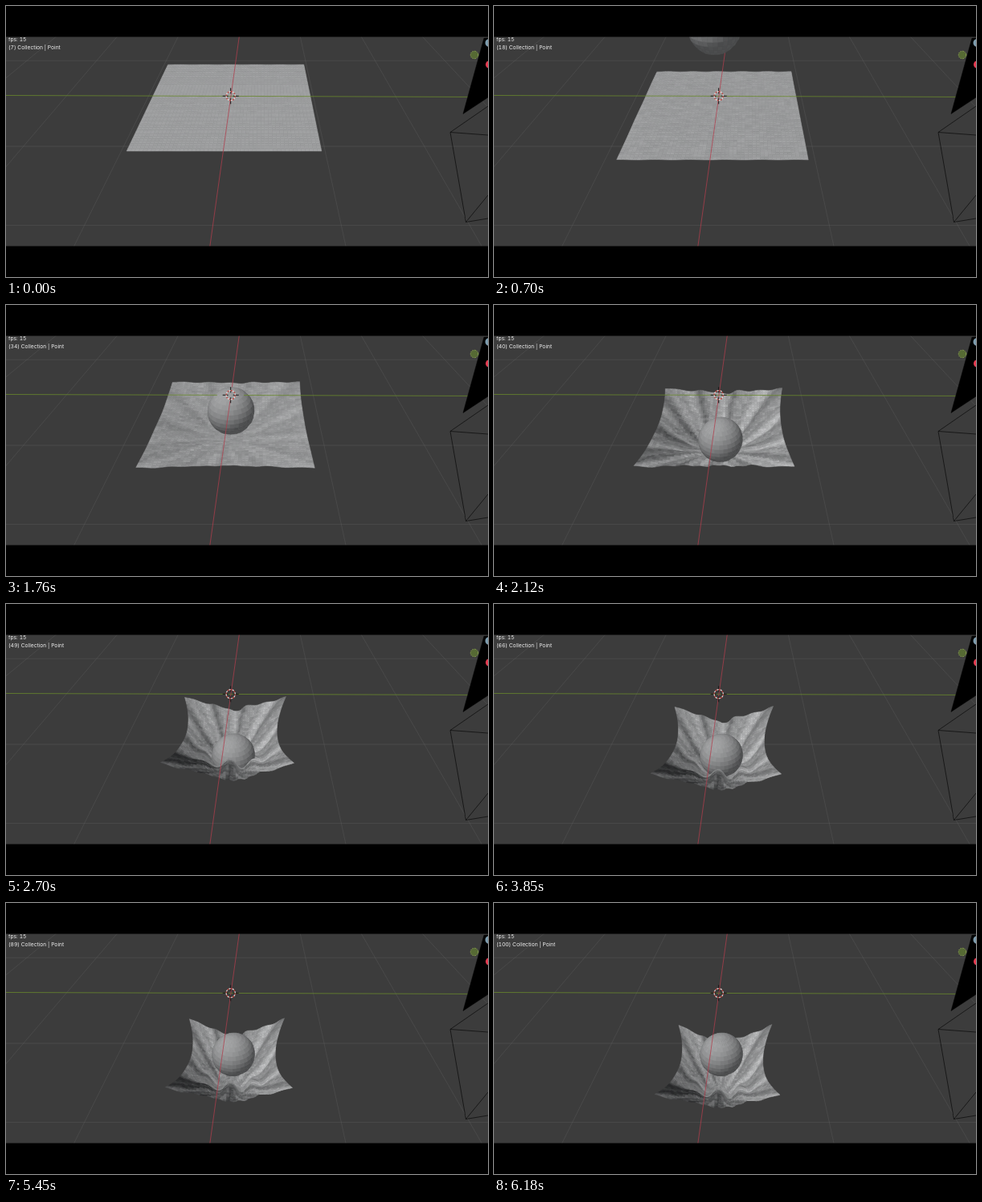
These frames come from a looping animation (600x338 px, 6.21 s). An HTML page with a canvas:

```html
<!DOCTYPE html>
<html>
<head>
<meta charset="utf-8">
<style>
html, body { margin: 0; height: 100%; overflow: hidden; background: #000; }
canvas { display: block; }
#label {
  position: absolute; left: 3px; top: 38.5px; height: 30px; overflow: hidden;
  font: 6.7px/10px Inter, "Open Sans", sans-serif; font-variant-numeric: tabular-nums;
  color: #f0f0f0; white-space: pre;
}
#label div { margin-top: -2px; }
</style>
</head>
<body>
<canvas id="stage" width="600" height="338"></canvas>
<div id="label"><div id="text"></div></div>
<script>
const c = document.getElementById('stage').getContext('2d');
const text = document.getElementById('text');
const LOOP = 6210, N = 48, RADIUS = 0.29, TAU = 2 * Math.PI;

const clamp = x => Math.min(1, Math.max(0, x));
const mix = (a, b, q) => a + (b - a) * q;
const smooth = x => { x = clamp(x); return x * x * (3 - 2 * x); };
const rand = (i, j) => { const v = Math.sin(i * 127.1 + j * 311.7) * 43758.5; return v - Math.floor(v); };
const gray = v => { v = Math.round(Math.min(205, Math.max(40, v))); return `rgb(${v},${v + 1},${v + 2})`; };

// Simulation frame shown at a time; playback slows slightly once the cloth is folded
function frameAt(time) {
  const keys = [[0, 7], [2700, 49.7], [4730, 78.7], [6180, 100.1]];
  const i = Math.max(1, keys.findIndex(k => time < k[0]));
  if (time >= 6180) return 100;
  const [[t0, n0], [t1, n1]] = [keys[i - 1], keys[i]];
  return Math.floor(mix(n0, n1, (time - t0) / (t1 - t0)));
}

// World: k toward the viewer, j to the right, z up
function project(k, j, z) {
  const w = 1 - 0.18 * k - 0.132 * z;
  return [(280 - 57.6 * k + 102.3 * j - 39.6 * z) / w, (112 + 31.5 * k - 106 * z) / w];
}

function line(a, b, color, width = 1) {
  c.strokeStyle = color;
  c.lineWidth = width;
  c.beginPath();
  c.moveTo(...a);
  c.lineTo(...b);
  c.stroke();
}

function poly(points, color) {
  c.fillStyle = c.strokeStyle = color;
  c.lineWidth = 0.5;
  c.beginPath();
  points.forEach(p => c.lineTo(...p));
  c.closePath();
  c.fill();
  c.stroke();
}

function arc(x, y, r, color, from = 0, to = TAU) {
  c.strokeStyle = color;
  c.beginPath();
  c.arc(x, y, r, from, to);
  c.stroke();
}

function dot(x, y, r, color) {
  c.fillStyle = color;
  c.beginPath();
  c.arc(x, y, r, 0, TAU);
  c.fill();
}

// Free fall, then braked by the cloth
function ballHeight(n) {
  return n < 32 ? 1.21 - 0.0013 * (n - 1) ** 2 : -0.95 + 0.91 * clamp((50 - n) / 18) ** 2;
}

// Stages of the cloth: crumpling in the air, folding around the ball, sinking past it
const stages = n => ({
  rough: clamp((n - 5) / 23),
  wrap: clamp((n - 31) / 18),
  crease: clamp((n - 31) / 9),
  late: clamp((n - 40) / 9),
  sink: clamp((n - 49) / 51)
});

// Creases radiate from the place where the ball lands
function fold(s, t) {
  const a = Math.atan2(t * 3 - 2, s * 1.7), d = Math.hypot(t * 3 - 2, s * 1.7);
  return (Math.sin(11 * a + s) + 0.7 * Math.sin(25 * a + 1)) * clamp(d * 1.2);
}

// s runs from -1 to 1 across the cloth, t from 0 at the back to 1 at the front
function clothPoint(s, t, n, { rough, wrap, crease, late, sink }) {
  const a = Math.abs(s), arch = Math.sin(Math.PI * t);
  const [flatX, flatY] = project(2 * t - 1, 0.982 * s, -0.06 - 0.01 * (Math.min(n, 31) - 7));

  const half = 63 - 44 * t + 64 * t * t - 5 * sink;
  const x = 283.5 + half * s + (2 - 10 * t + 2.5 * sink) * a;
  const edge = 116 + 115 * t - 33 * t * t + (36 + 5 * t) * sink;
  const middle = 133 + 88 * t + 8 * arch + (45 - 10 * t) * sink;
  const y = mix(middle, edge, a) + 32 * a * (1 - a) * arch;

  const cup = 56 * wrap * (1 - wrap) * Math.cos(1.4 * Math.PI * (t - 0.4)) * (1 - a);
  const hump = 6 * late * Math.cos(2 * TAU * (s + 0.08)) * (1 - s * s) ** 2 * clamp(1 - Math.abs(3 * t - 2));
  const wave = crease * fold(s, t) * (1 - a ** 6);
  const ripple = rough * 0.45 * Math.sin(s * 17 + t * 15);
  return [mix(flatX, x, wrap) + wave * 0.8, mix(flatY, y, wrap) + cup - hump + wave + ripple];
}

function clothShade(i, j, { rough, crease, late }) {
  const s = (i + 0.5) / N * 2 - 1, t = (j + 0.5) / N;
  const streak = rand(i >> 1, j) - 0.5, grain = rand(i, j + 60) - 0.5;
  let v = 159 - 5 * rough + crease * (10 * s - 8);
  v += streak * (2 + 10 * rough) + grain * (2 + 5 * rough + 14 * crease);
  v += 19 * crease * fold(s + 0.05, t);
  v -= 26 * crease * smooth(3.6 * t - 0.7) * smooth(0.2 - s);
  v -= late * smooth(12 * t - 7.8) * mix(54, 8, smooth(1.8 * s + 0.1));
  return gray(v);
}

function cloth(grid, from, to, stage) {
  for (let j = from; j < to; j++) for (let i = 0; i < N; i++)
    poly([grid[j][i], grid[j][i + 1], grid[j + 1][i + 1], grid[j + 1][i]], clothShade(i, j, stage));
}

function normal(lat, lon) {
  return [Math.sin(lat) * Math.cos(lon), Math.sin(lat) * Math.sin(lon), Math.cos(lat)];
}

// Draws the facets above or below the ground plane
function ball(z, above) {
  const step = Math.PI / 16, cam = [3.6, 0.15, 2.65 - z], dist = Math.hypot(...cam);
  const shift = -0.008 - 0.02 * z;
  for (let a = 15; a >= 0; a--) for (let b = 0; b < 32; b++) {
    const m = normal((a + 0.5) * step, (b + 0.5) * step);
    if ((z + RADIUS * m[2] >= 0) !== above) continue;
    if (m[0] * cam[0] + m[1] * cam[1] + m[2] * cam[2] < RADIUS) continue;
    const corners = [[a, b], [a, b + 1], [a + 1, b + 1], [a + 1, b]].map(([p, q]) => {
      const v = normal(p * step, q * step);
      return project(v[0] * RADIUS, v[1] * RADIUS + shift, z + v[2] * RADIUS);
    });
    const light = Math.max(0, 0.35 * m[0] - 0.32 * m[1] + 0.88 * m[2]);
    poly(corners, gray(74 + 88 * light + ((a + b) % 2) * 3));
  }
}

function floorGrid() {
  const color = 'rgba(105,105,105,.36)';
  for (let j = -6; j <= 6; j++) if (j) line(project(-4, j, 0), project(4, j, 0), color, 0.8);
  for (const k of [-1, 1, 2]) line(project(k, -8, 0), project(k, 8, 0), color, 0.8);
}

function axes() {
  line([0, 111.5], [600, 113.5], 'rgba(104,136,44,.8)');
  line(project(-3, 0, 0), project(4, 0, 0), 'rgba(176,62,76,.75)');
}

function cursor() {
  const x = 279.7, y = 112.3;
  for (let i = 0; i < 4; i++) {
    const dx = Math.cos(i * TAU / 4), dy = Math.sin(i * TAU / 4);
    line([x + dx * 3, y + dy * 3], [x + dx * 10, y + dy * 10], '#161616');
  }
  c.lineWidth = 1.2;
  for (let i = 0; i < 16; i++) arc(x, y, 5.6, i % 2 ? '#e8dede' : '#c4423c', i * TAU / 16, (i + 1) * TAU / 16);
}

function sideItems() {
  poly([[595, 40], [600, 40], [600, 114], [569, 134.5]], '#000');
  const p = [553, 157.5], q = [572.5, 269.5];
  for (const [a, b] of [[p, q], [p, [600, 125]], [p, [600, 161]], [q, [600, 236]], [q, [600, 265]]])
    line(a, b, 'rgba(10,10,10,.8)', 0.9);
  dot(583, 61, 4.3, '#566a34');
  c.setLineDash([1.7, 1]);
  arc(583, 61, 4.7, '#9bbb50');
  c.setLineDash([]);
  dot(601.5, 46, 5, '#7d9cae');
  dot(602, 73, 5, '#e63a50');
}

function draw(time) {
  const n = frameAt(time), z = ballHeight(n), stage = stages(n), split = N * 2 / 3;
  const grid = Array.from({ length: N + 1 }, (_, j) =>
    Array.from({ length: N + 1 }, (_, i) => clothPoint(i / N * 2 - 1, j / N, n, stage)));
  const layers = [() => ball(z, false), () => cloth(grid, split, N, stage)];

  c.fillStyle = '#3c3c3c';
  c.fillRect(0, 0, 600, 338);
  floorGrid();
  cloth(grid, 0, split, stage);
  // The front flap rises over the ball as the cloth wraps
  if (stage.wrap < 0.65) layers.reverse();
  layers.forEach(layer => layer());
  axes();
  ball(z, true);
  cursor();
  sideItems();

  c.fillStyle = '#000';
  c.fillRect(0, 0, 600, 38.5);
  c.fillRect(0, 299.5, 600, 39);
  text.textContent = `fps: 15\n(${n}) Collection | Point`;
}

function tick() {
  draw(performance.now() % LOOP);
  requestAnimationFrame(tick);
}
tick();
</script>
</body>
</html>
```
